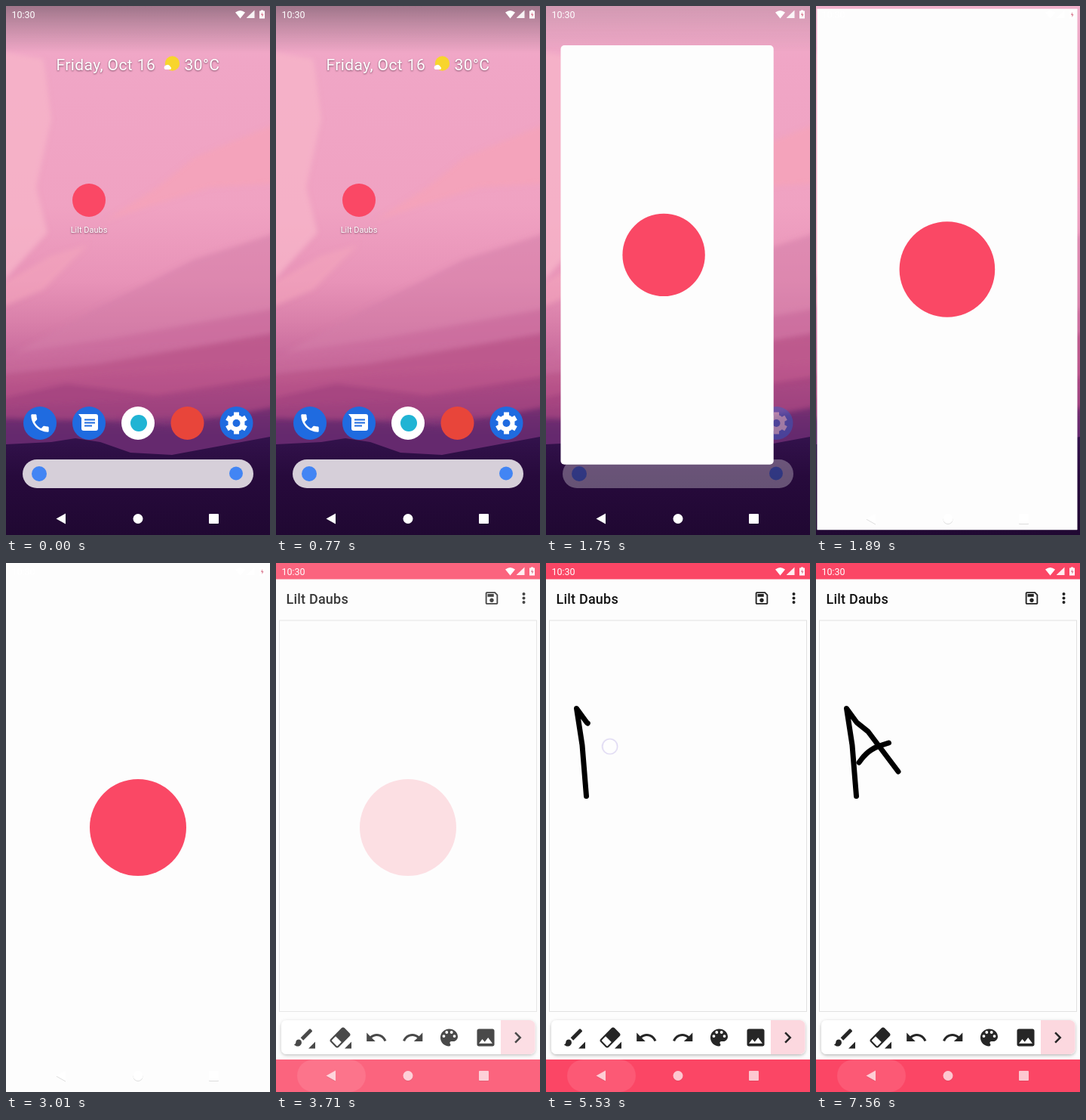
These frames come from a looping animation (350x700 px, 8 s). An HTML page:

```html
<!DOCTYPE html>
<html lang="en">
<head>
<meta charset="utf-8">
<title>Lilt Daubs</title>
<style>
html, body { margin: 0; width: 100%; height: 100%; overflow: hidden; background: #fdfdfd; }
svg { display: block; width: 350px; height: 700px; font-family: Roboto, "Noto Sans", sans-serif; }
.home, .window, .logo, .splash, .app, .nav, .ink, .touch { animation: 8s linear infinite; }
.label { fill: #fff; filter: drop-shadow(0 1px 1px rgba(50, 20, 40, .6)); }

/* launch */
.home { animation-name: home; }
.window { animation-name: grow, appear; }
.logo { animation-name: rise, slide; }
.splash { animation-name: splash; }
.app { animation-name: app; }
.nav { animation-name: nav; filter: drop-shadow(0 1px .4px rgba(0, 0, 0, .13)); }
@keyframes home {
  0%, 19.25% { opacity: 1; animation-timing-function: ease-in; }
  22.75%, 100% { opacity: 0; }
}
@keyframes grow {
  0%, 19.25% { x: 88px; y: 235px; width: 44px; height: 44px; rx: 22px; animation-timing-function: cubic-bezier(.4, 0, .2, 1); }
  24.5%, 100% { x: 0; y: 0; width: 350px; height: 700px; rx: 0; }
}
@keyframes appear {
  0%, 20.125% { opacity: 0; }
  21.125%, 100% { opacity: 1; }
}
@keyframes rise {
  0%, 19.25% { cy: 257px; r: 22px; animation-timing-function: cubic-bezier(.4, 0, .2, 1); }
  24.5%, 100% { cy: 350px; r: 64px; }
}
@keyframes slide {
  0%, 19.25% { cx: 110px; animation-timing-function: cubic-bezier(.6, 0, .2, 1); }
  24.5%, 100% { cx: 175px; }
}
@keyframes splash {
  0%, 42.875% { opacity: 1; animation-timing-function: cubic-bezier(.25, .46, .45, .94); }
  49%, 100% { opacity: 0; }
}
@keyframes app {
  0%, 24.99% { visibility: hidden; }
  25%, 100% { visibility: visible; }
}
@keyframes nav {
  0%, 42.875% { opacity: 1; }
  46%, 100% { opacity: .7; }
}

/* drawing */
.ink { fill: none; stroke: #000; stroke-width: 7; stroke-linecap: round; stroke-linejoin: round; }
.leg { stroke-dasharray: 227 300; animation-name: leg; }
.bar { stroke-dasharray: 49 100; animation-name: bar; }
.touch { fill: #fff; fill-opacity: .6; stroke: #d3cbee; stroke-width: 1.2; animation-name: touch, press; }
@keyframes leg {
  0%, 65.49% { stroke-dashoffset: 227; opacity: 0; }
  65.5% { stroke-dashoffset: 227; opacity: 1; }
  68.125% { stroke-dashoffset: 109; }
  69.125% { stroke-dashoffset: 86; }
  72.5%, 100% { stroke-dashoffset: 0; opacity: 1; }
}
@keyframes bar {
  0%, 82.12% { stroke-dashoffset: 49; opacity: 0; }
  82.125% { stroke-dashoffset: 49; opacity: 1; }
  86.625%, 100% { stroke-dashoffset: 0; opacity: 1; }
}
@keyframes touch {
  0%, 63.875% { transform: translate(53px, 309px); }
  65.25% { transform: translate(48px, 241px); }
  66.5% { transform: translate(40px, 192px); }
  67.5% { transform: translate(54px, 211px); }
  69.125% { transform: translate(84.5px, 242.5px); }
  70.875%, 80.4% { transform: translate(109px, 276px); }
  80.5% { transform: translate(57px, 264px); }
  82.25% { transform: translate(73px, 248px); }
  83.5% { transform: translate(84px, 242px); }
  85%, 100% { transform: translate(97px, 238px); }
}
@keyframes press {
  0%, 63.8% { opacity: 0; }
  63.875%, 71% { opacity: 1; }
  72%, 80.45% { opacity: 0; }
  80.5%, 85.2% { opacity: 1; }
  86%, 100% { opacity: 0; }
}
</style>
</head>
<body>
<svg viewBox="0 0 350 700">
  <defs>
    <linearGradient id="sky" x2="0" y2="1">
      <stop offset="0" stop-color="#f0b0cb"/>
      <stop offset=".1" stop-color="#f0a6c6"/>
      <stop offset=".38" stop-color="#f0a2c2"/>
      <stop offset=".52" stop-color="#e893b8"/>
      <stop offset=".6" stop-color="#d87fa9"/>
      <stop offset=".68" stop-color="#c5669a"/>
      <stop offset=".76" stop-color="#9c427f"/>
      <stop offset=".81" stop-color="#6d2f73"/>
    </linearGradient>
    <linearGradient id="ground" x2="0" y2="1">
      <stop offset="0" stop-color="#33124c"/>
      <stop offset=".4" stop-color="#270a3c"/>
      <stop offset="1" stop-color="#200832"/>
    </linearGradient>
    <linearGradient id="scrim" x2="0" y2="1">
      <stop offset="0" stop-color="#302430" stop-opacity=".42"/>
      <stop offset=".35" stop-color="#302430" stop-opacity=".26"/>
      <stop offset="1" stop-color="#302430" stop-opacity="0"/>
    </linearGradient>
    <filter id="soft"><feGaussianBlur stdDeviation="3"/></filter>
    <filter id="lift" x="-10%" y="-20%" width="120%" height="150%">
      <feDropShadow dx="0" dy="1.5" stdDeviation="2" flood-opacity=".28"/>
    </filter>
  </defs>

  <!-- wallpaper -->
  <rect width="350" height="700" fill="url(#sky)"/>
  <g filter="url(#soft)">
    <path d="M-9 60L50 70 60 150 40 240 55 300-9 370z" fill="#f7b5c9" opacity=".8"/>
    <path d="M130 285L200 240 250 200 359 155V235L270 240 190 265z" fill="#f7a3b6" opacity=".6"/>
    <path d="M-9 370L60 330 110 315 50 375-9 400z" fill="#f3a6bc" opacity=".6"/>
    <path d="M-9 470L120 400 250 335 359 300V440z" fill="#d37ea8" opacity=".55"/>
    <path d="M-9 462L140 440 359 400V470L-9 500z" fill="#c9699a" opacity=".6"/>
    <path d="M-9 488L120 474 359 432V500L180 520-9 530z" fill="#b95389" opacity=".75"/>
    <path d="M-9 520L80 500 200 515 359 490V540L-9 550z" fill="#a2427f" opacity=".7"/>
    <path d="M-9 545L100 548 220 556 359 530V610H-9z" fill="#64296d" opacity=".75"/>
  </g>
  <path d="M0 580L60 577 92 572 125 577 165 591 220 594 285 582 350 570V700H0z" fill="url(#ground)"/>

  <!-- home screen -->
  <g class="home">
    <rect width="350" height="62" fill="url(#scrim)"/>
    <g class="label" font-size="21" letter-spacing=".4">
      <text x="66.500" y="84.500">Friday, Oct 16</text>
      <text x="236.500" y="84.500">30°C</text>
    </g>
    <circle cx="220.500" cy="76" r="9.700" fill="#f8d52c"/>
    <path d="M211 84a3 3 0 0 1 1-5.500 4 4 0 0 1 6 2 2 2 0 0 1 0 3.500z" fill="#fff"/>
    <text class="label" x="110" y="299.500" font-size="11" text-anchor="middle">Lilt Daubs</text>

    <g fill="#1f6be0">
      <circle cx="45" cy="552" r="22"/>
      <circle cx="110" cy="552" r="22"/>
      <circle cx="305.500" cy="552" r="22"/>
    </g>
    <g fill="#fff">
      <path transform="translate(45 552) scale(1.3) translate(-12 -12)" d="M20 15.500c-1.250 0-2.450-.2-3.570-.57-.35-.11-.74-.03-1.020.24l-2.200 2.200c-2.830-1.440-5.150-3.750-6.590-6.590l2.200-2.210c.28-.26.36-.65.25-1C8.700 6.450 8.500 5.250 8.500 4c0-.55-.45-1-1-1H4c-.55 0-1 .45-1 1 0 9.390 7.610 17 17 17 .55 0 1-.45 1-1v-3.500c0-.55-.45-1-1-1z"/>
      <path d="M96 540H119a3 3 0 0 1 3 3V559a3 3 0 0 1-3 3H103a3 3 0 0 1-3-3V545z"/>
      <path d="M104 547.500H118M104 551.500H118M104 555.500H114" stroke="#1f6be0" stroke-width="1.800"/>
      <g transform="translate(305.500 552)">
        <circle r="11"/>
        <path d="M0-14.500V14.500M-12.560-7.250L12.560 7.250M-12.560 7.250L12.560-7.250" stroke="#fff" stroke-width="7"/>
        <circle r="5" fill="#1f6be0"/>
      </g>
      <circle cx="175" cy="552" r="22"/>
    </g>
    <circle cx="176" cy="552" r="11" fill="#20b4d4"/>
    <circle cx="240.500" cy="552" r="22" fill="#e8453a"/>
    <rect x="22" y="600" width="306" height="38" rx="19" fill="#d6cfd9"/>
    <circle cx="44" cy="619" r="10" fill="#4285f4"/>
    <circle cx="305" cy="618.500" r="9" fill="#4285f4"/>
  </g>

  <!-- paint app -->
  <g class="app">
    <rect width="350" height="700" fill="#fdfdfd"/>
    <rect width="350" height="21.500" fill="#fb4665"/>
    <rect y="657" width="350" height="43" fill="#fb4665"/>
    <rect x="28" y="657" width="91" height="43" rx="21.500" fill="#fff" opacity=".1"/>
    <text x="13.500" y="53.500" font-size="18" font-weight="500" letter-spacing=".2" fill="#111">Lilt Daubs</text>
    <g fill="#222">
      <path transform="translate(286 46.500) scale(.92) translate(-12 -12)" d="M17 3H5c-1.110 0-2 .9-2 2v14c0 1.100.89 2 2 2h14c1.100 0 2-.9 2-2V7l-4-4zm2 16H5V5h11.170L19 7.830V19zm-7-7c-1.660 0-3 1.340-3 3s1.340 3 3 3 3-1.340 3-3-1.340-3-3-3zM6 6h9v4H6z"/>
      <circle cx="328.500" cy="41" r="2"/>
      <circle cx="328.500" cy="46.500" r="2"/>
      <circle cx="328.500" cy="52" r="2"/>
    </g>
    <rect x="4.500" y="76" width="341" height="517.500" fill="none" stroke="#e1e1e1"/>

    <rect x="7" y="605" width="336.500" height="45" rx="7" fill="#fff" filter="url(#lift)"/>
    <path d="M298 605H336.500a7 7 0 0 1 7 7V643a7 7 0 0 1-7 7H298z" fill="#fcd8df"/>
    <g fill="#262626">
      <path transform="translate(36.500 628) scale(1.280) translate(-12 -12)" d="M7 14c-1.660 0-3 1.340-3 3 0 1.310-1.160 2-2 2 .92 1.220 2.490 2 4 2 2.210 0 4-1.790 4-4 0-1.660-1.340-3-3-3zm13.710-9.370l-1.340-1.340c-.39-.39-1.020-.39-1.410 0L9 12.250 11.750 15l8.960-8.960c.39-.39.39-1.020 0-1.410z"/>
      <path d="M52 633.500V642.500H43zM100 633.500V642.500H91z"/>
      <g transform="translate(85 628) rotate(-45)">
        <rect x="-12" y="-6.500" width="24" height="13" rx="2" fill="none" stroke="#262626" stroke-width="2.200"/>
        <path d="M-3-6.500H12V6.500H-3z"/>
      </g>
      <path transform="translate(133 628) scale(1.280) translate(-12 -12)" d="M12.500 8c-2.650 0-5.050.99-6.900 2.600L2 7v9h9l-3.620-3.620c1.390-1.160 3.160-1.880 5.120-1.880 3.540 0 6.550 2.310 7.600 5.500l2.370-.78C21.080 11.030 17.150 8 12.500 8z"/>
      <path transform="translate(181.500 628) scale(-1.280 1.280) translate(-12 -12)" d="M12.500 8c-2.650 0-5.050.99-6.900 2.600L2 7v9h9l-3.620-3.620c1.390-1.160 3.160-1.880 5.120-1.880 3.540 0 6.550 2.310 7.600 5.500l2.370-.78C21.080 11.030 17.150 8 12.500 8z"/>
      <g transform="translate(229.500 628) scale(1.280) translate(-12 -12)">
        <path d="M12 3c-4.970 0-9 4.030-9 9s4.030 9 9 9c.83 0 1.500-.67 1.500-1.500 0-.39-.15-.74-.39-1.010-.23-.26-.38-.61-.38-.99 0-.83.67-1.500 1.500-1.500H16c2.760 0 5-2.240 5-5 0-4.420-4.030-8-9-8z"/>
        <g fill="#fff">
          <circle cx="6.500" cy="10.500" r="1.500"/>
          <circle cx="9.500" cy="6.500" r="1.500"/>
          <circle cx="14.500" cy="6.500" r="1.500"/>
          <circle cx="17.500" cy="10.500" r="1.500"/>
        </g>
      </g>
      <path transform="translate(278 628) scale(1.280) translate(-12 -12)" d="M21 19V5c0-1.100-.9-2-2-2H5c-1.100 0-2 .9-2 2v14c0 1.100.9 2 2 2h14c1.100 0 2-.9 2-2zM8.500 13.500l2.500 3.010L14.500 12l4.500 6H5l3.500-4.500z"/>
      <path transform="translate(320.500 628) scale(1.250) translate(-12 -12)" d="M10 6L8.590 7.410 13.170 12l-4.580 4.590L10 18l6-6z"/>
    </g>

    <path class="ink leg" d="M53.500 308.500L48 241 40.500 192.500 54 211 69 223 109 276"/>
    <path class="ink bar" d="M57 264L60 260Q66 252 73 247.500T84 242L96.500 238"/>
    <circle class="touch" r="10"/>
  </g>

  <!-- launch window -->
  <g class="splash">
    <rect class="window" fill="#fdfdfd"/>
    <circle class="logo" fill="#fa4865"/>
  </g>

  <!-- system bars -->
  <g fill="#fff">
    <text x="7.500" y="15.500" font-size="12.500">10:30</text>
    <path d="M304 8.500Q310.500 3.500 317 8.500L310.500 16.500z"/>
    <path d="M319 16V15.500L329.500 5.500V16z" opacity=".9"/>
    <path d="M338 5.500H341V6.500H343V16.500H336V6.500H338z"/>
    <path d="M340 8L338 12H339.500V15L341.500 11H340z" fill="#d97c93"/>
    <g class="nav">
      <path d="M66.500 678.500L79 671.500V685.500z"/>
      <circle cx="175" cy="678.500" r="6.500"/>
      <rect x="269" y="672" width="13" height="13" rx="1"/>
    </g>
  </g>
</svg>
</body>
</html>
```
